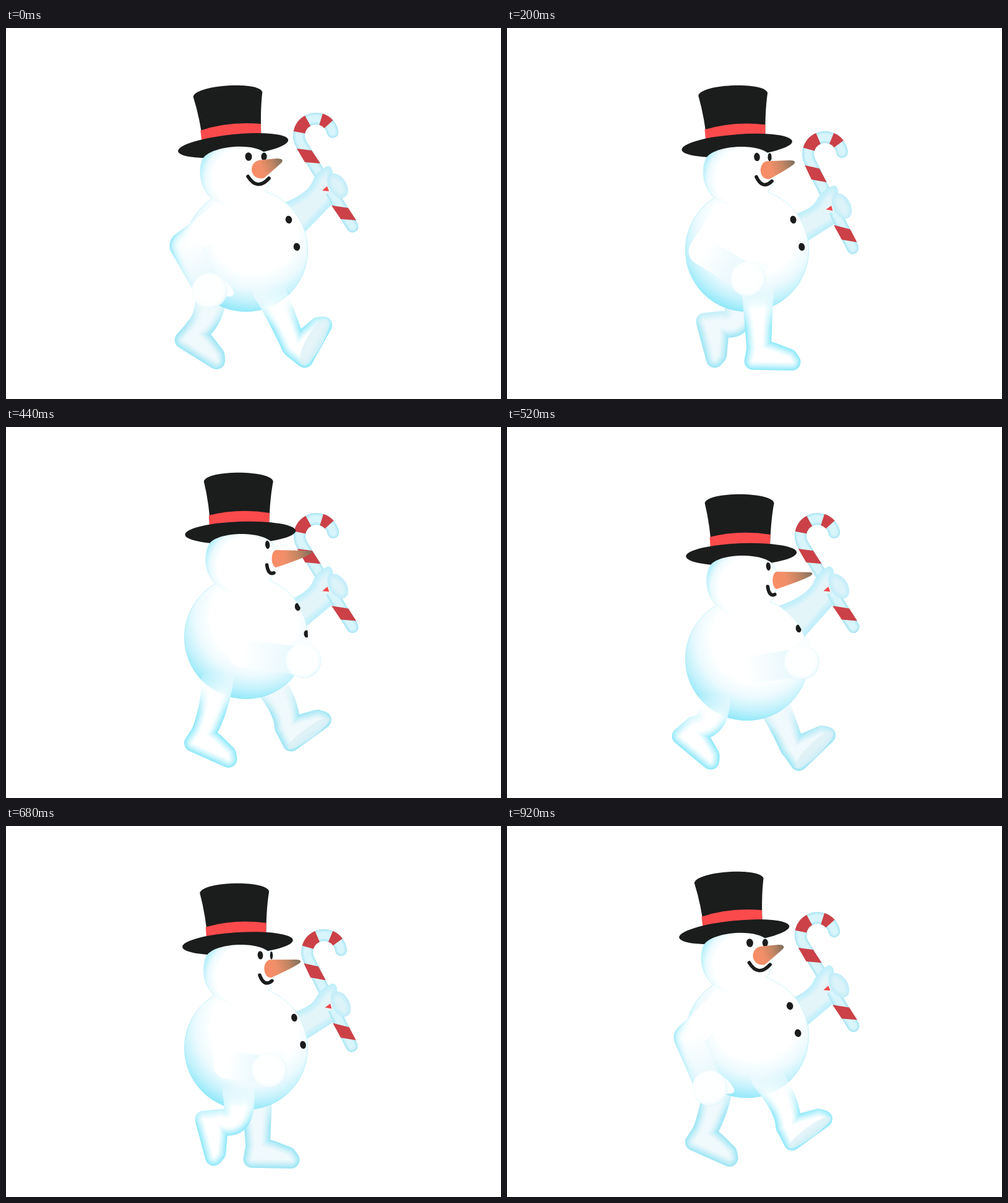
Animation, 800 px wide and 600 px high, one loop 0.96 s. Source, as an HTML page with a canvas:

```html
<!DOCTYPE html>
<html lang="en">
<head>
<meta charset="utf-8">
<title>Marching snowman</title>
<style>
html, body { margin: 0; width: 100%; height: 100%; overflow: hidden; background: #fff; }
canvas { display: block; width: 800px; height: 600px; }
</style>
</head>
<body>
<canvas id="stage" width="800" height="600"></canvas>
<script>
const LOOP = 960, STEP = 40, TAU = Math.PI * 2;
const INK = '#1b1c1c', RED = '#cb4147';
const ctx = document.getElementById('stage').getContext('2d');
const layer = document.createElement('canvas');
layer.width = 800;
layer.height = 600;
const legCtx = layer.getContext('2d');

// Body height over half a loop, one value per step.
const BOB = [40, 56, 66, 67, 57, 40, 22, 7, 0, -3.5, 4, 21];

// time, hip x, knee x, knee y, ankle x, ankle y, foot angle
const LEG = [
  [0, 425, 445, 465, 466, 516, -61],
  [120, 425, 440, 492, 443, 514, 0],
  [200, 405, 406, 465, 407, 515, 1],
  [320, 373, 368, 440, 364, 502, 13],
  [440, 342, 336, 452, 320, 493, 24],
  [480, 333, 326, 468, 307, 489, 32],
  [600, 345, 349, 490, 304, 484, 55],
  [680, 375, 376, 478, 345, 477, 75],
  [800, 415, 428, 425, 413, 441, 25],
  [920, 420, 450, 452, 454, 486, -36]
];

// time, elbow x, elbow y, hand x, hand y, thumb angle
const ARM = [
  [0, 287, 352, 329, 425, 6],
  [200, 316, 361, 390, 406, -35],
  [320, 365, 347, 443, 388, -61],
  [440, 383, 367, 481, 378, -75],
  [600, 380, 410, 458, 386, -68],
  [800, 317, 338, 370, 411, -14],
  [920, 292, 342, 328, 424, 6]
];

// Smooth periodic interpolation through a table of rows.
function sample(rows, t) {
  const n = rows.length;
  const at = i => {
    const turn = Math.floor(i / n), row = rows[i - turn * n];
    return [row[0] + turn * LOOP, ...row.slice(1)];
  };
  t = (t % LOOP + LOOP) % LOOP;
  let i = n - 1;
  while (rows[i][0] > t) i--;
  const [p, a, b, q] = [at(i - 1), at(i), at(i + 1), at(i + 2)];
  const span = b[0] - a[0], s = (t - a[0]) / span;
  return a.slice(1).map((v, j) => {
    const c = j + 1;
    const ma = (b[c] - p[c]) / (b[0] - p[0]) * span;
    const mb = (q[c] - v) / (q[0] - a[0]) * span;
    const d = b[c] - v;
    return v + s * (ma + s * (3 * d - 2 * ma - mb + s * (ma + mb - 2 * d)));
  });
}

const rad = deg => deg * Math.PI / 180;
const mix = (a, b, f) => `rgb(${a.map((v, i) => Math.round(v + (b[i] - v) * f))})`;

function radial(x, y, r, ...stops) {
  const g = ctx.createRadialGradient(x, y, 0, x, y, r);
  stops.forEach(([at, color]) => g.addColorStop(at, color));
  return g;
}

function linear(c, x0, y0, x1, y1, ...colors) {
  const g = c.createLinearGradient(x0, y0, x1, y1);
  colors.forEach((color, i) => g.addColorStop(i / (colors.length - 1), color));
  return g;
}

function oval(x, y, rx, ry, turn, fill) {
  ctx.beginPath();
  ctx.ellipse(x, y, rx, ry, turn, 0, TAU);
  ctx.fillStyle = fill;
  ctx.fill();
}

function poly(fill, ...pts) {
  ctx.beginPath();
  pts.forEach(p => ctx.lineTo(...p));
  ctx.fillStyle = fill;
  ctx.fill();
}

function line(path, color, width, cap = 'round') {
  ctx.strokeStyle = color;
  ctx.lineWidth = width;
  ctx.lineCap = cap;
  ctx.lineJoin = 'round';
  ctx.stroke(path);
}

// Fills a shape and darkens it softly towards its outline.
function soft(path, base, rim, depth) {
  ctx.save();
  ctx.clip(path);
  ctx.fillStyle = base;
  ctx.fill(path);
  ctx.globalAlpha = 0.13;
  for (let i = 1; i <= 6; i++) line(path, rim, depth * 2 * i / 6);
  ctx.restore();
}

// Bent, tapering limb plus foot, painted in shrinking layers from rim to base.
function leg(c, t, dy, rim, base) {
  const [hx, kx, ky, ax, ay, turn] = sample(LEG, t);
  const hy = 385 + dy;
  const bx = 1.5 * kx - (hx + ax) / 4, by = 1.5 * ky - (hy + ay) / 4;
  const bend = (s, a, b, d) => (1 - s) * (1 - s) * a + 2 * s * (1 - s) * b + s * s * d;
  const foot = new Path2D();
  const co = Math.cos(rad(turn)), si = Math.sin(rad(turn));
  for (const [x, y] of [[-5, 0], [-9, 24], [54, 24], [49, 17], [22, 7]]) {
    foot.lineTo(ax + x * co - y * si, ay + x * si + y * co);
  }
  foot.closePath();
  c.lineJoin = 'round';
  for (let i = 0; i <= 16; i++) {
    const f = i / 16, inset = 15 * f;
    const color = mix(rim, base, 1 - Math.pow(1 - f, 1.4));
    c.fillStyle = c.strokeStyle = linear(c, 0, 395 + dy, 0, 445 + dy, mix(base, base, 0), color);
    const limb = new Path2D();
    for (let s = 0; s <= 1; s += 0.025) {
      const x = bend(s, hx, bx, ax), r = 26 - 6 * s - inset;
      limb.moveTo(x + r, bend(s, hy, by, ay));
      limb.arc(x, bend(s, hy, by, ay), r, 0, TAU);
    }
    c.fill(limb);
    c.fill(foot);
    c.lineWidth = Math.max(28 - 2 * inset, 0.5);
    c.stroke(foot);
  }
  // The sole shows while the toes point up.
  const tilt = 15 * Math.max(0, -si);
  c.save();
  c.translate(ax, ay);
  c.rotate(rad(turn));
  c.beginPath();
  c.ellipse(23, 37 - tilt, 42, tilt, 0, 0, TAU);
  c.fillStyle = 'rgba(220,241,246,.75)';
  c.fill();
  c.restore();
}

function nearLeg(t, dy) {
  legCtx.globalCompositeOperation = 'source-over';
  legCtx.clearRect(0, 0, 800, 600);
  leg(legCtx, t, dy, [142, 232, 250], [255, 255, 255]);
  // Let the thigh melt into the belly.
  legCtx.globalCompositeOperation = 'destination-in';
  legCtx.fillStyle = linear(legCtx, 0, 375 + dy, 0, 415 + dy, 'rgba(0,0,0,0)', '#000');
  legCtx.fillRect(0, 0, 800, 600);
  ctx.drawImage(layer, 0, 0);
}

function caneArm(t, dy) {
  const u = (1 - Math.cos(TAU * t / 480)) / 2;
  const turn = rad(5.9 * u), co = Math.cos(turn), si = Math.sin(turn);
  const cx = 530 + 6 * u, cy = 251 + 34.7 * u;
  const at = (x, y) => {
    const px = x - 530, py = y - 251;
    return [cx + px * co - py * si, cy + px * si + py * co];
  };
  const inCane = draw => {
    ctx.save();
    ctx.translate(cx, cy);
    ctx.rotate(turn);
    ctx.translate(-530, -251);
    draw();
    ctx.restore();
  };
  const stick = (path, cap) => {
    line(path, '#a9e6f4', 19, cap);
    line(path, '#c4eef8', 16, cap);
    line(path, '#d8f5fc', 11, cap);
  };
  const stripe = (a, b) => {
    const arc = new Path2D();
    arc.arc(501, 174, 27.5, rad(a), rad(b));
    line(arc, RED, 19, 'butt');
  };

  inCane(() => {
    const cane = new Path2D('M560 321L477.6 188.4');
    cane.arc(501, 174, 27.5, rad(148.4), rad(348));
    stick(cane);
    stripe(191, 241);
    stripe(287, 318);
    poly(RED, [470, 195], [494, 198], [508, 219], [483, 217]);
  });

  const arm = new Path2D();
  arm.moveTo(440, 281 + 22 * u + 0.12 * dy);
  arm.quadraticCurveTo(...at(485, 271), ...at(495, 249));
  arm.quadraticCurveTo(...at(502, 231), ...at(520, 223));
  arm.quadraticCurveTo(...at(528, 224), ...at(528, 238));
  arm.lineTo(...at(538, 260));
  arm.lineTo(...at(527, 285));
  arm.lineTo(440, 346 + 0.7 * dy);
  arm.closePath();
  soft(arm, '#e4f5fa', '#a4e5f4', 12);

  inCane(() => {
    stick(new Path2D('M525 264L560 321'), 'butt');
    stick(new Path2D('M552 308L560 321'));
    poly(RED, [526, 287], [553, 291], [566, 311], [541, 309]);
    poly('#f2484b', [511, 263], [519, 256], [522, 264]);
    const fingers = new Path2D();
    fingers.ellipse(536, 255, 22, 14, rad(56), 0, TAU);
    soft(fingers, '#dcf3f9', '#b4e8f5', 8);
  });
}

function body(dy) {
  const y = 319 + dy;
  oval(388, y, 100, 100, 0, radial(401, y - 32, 135,
    [0, '#fff'], [0.52, '#fff'], [0.7, '#ecfafe'], [0.85, '#c6f2fc'], [1, '#8ee8fa']));
  const edge = new Path2D();
  edge.arc(388, y, 99.5, 0, TAU);
  line(edge, 'rgba(150,232,248,.5)', 1);
}

function buttons(dy, k) {
  ctx.save();
  ctx.beginPath();
  ctx.arc(388, 319 + dy, 100, 0, TAU);
  ctx.clip();
  oval(457 + 14.5 * k, 270 + dy, 5.3 - 0.8 * k, 6.3, -0.2, INK);
  oval(470 + 16.3 * k, 314 + dy, 5.3 - 0.8 * k, 6.3, -0.2, INK);
  ctx.restore();
}

function nearArm(t, dy) {
  const [ex, ey, hx, hy, thumb] = sample(ARM, t);
  const whole = new Path2D(`M358 ${258 + dy}L${ex} ${ey}L${hx} ${hy}`);
  const fore = new Path2D(`M${ex} ${ey}L${hx} ${hy}`);
  line(whole, radial(388, 319 + dy, 124,
    [0, '#fff'], [0.75, '#fff'], [0.87, '#c4f2fc'], [1, '#93e9fa']), 45, 'butt');
  for (let w = 41; w > 12; w -= 4) line(whole, 'rgba(255,255,255,.22)', w, 'butt');
  line(fore, linear(ctx, ex, ey, hx, hy, 'rgba(222,245,252,0)', 'rgba(222,245,252,.85)'), 45, 'butt');

  ctx.save();
  ctx.translate(hx, hy);
  ctx.rotate(rad(thumb));
  ctx.beginPath();
  ctx.moveTo(4, -27);
  ctx.quadraticCurveTo(32, -18, 40, 0);
  ctx.quadraticCurveTo(38, 7, 24, 6);
  ctx.closePath();
  ctx.fillStyle = '#fafeff';
  ctx.fill();
  ctx.restore();
  oval(hx, hy, 28.5, 28.5, 0, radial(hx - 2, hy - 2, 31,
    [0, '#fff'], [0.75, '#fdffff'], [0.9, '#f5fcfe'], [1, '#def6fc']));
}

function hat() {
  ctx.fillStyle = INK;
  ctx.fill(new Path2D('M320 67C324 48 428 48 432 67Q426 98 425 148H331Q329 104 320 67Z'));
  ctx.fillStyle = '#fb4a4c';
  ctx.fill(new Path2D('M328 122Q375 110 426 118L425 142H329Z'));
  oval(379, 150, 89.5, 18, rad(-2), INK);
}

function face(dy, k) {
  ctx.save();
  ctx.translate(0, dy);
  oval(392 + 31 * k, 168 + 1.5 * k, 5.5 - 1.9 * k, 6.8, -0.1, INK);
  if (k < 0.8) oval(417 + 19.5 * k, 168 + 2 * k, 4.6 - 3.9 * k, 6.5, 0, INK);

  const mouth = new Path2D();
  mouth.moveTo(391 + 31 * k, 200 + 2 * k);
  mouth.quadraticCurveTo(406 + 18 * k, 224 - 5 * k, 425 + 8 * k, 203 + 12 * k);
  line(mouth, INK, 5.6);

  const x = 412 + 25 * k, y = 188.5 + 3.5 * k, rx = 15 - 8 * k, ry = 15 - k;
  const tx = 446 + 48 * k, ty = 175 + 6 * k;
  ctx.beginPath();
  ctx.ellipse(x, y, rx, ry, 0, rad(70), rad(270));
  ctx.lineTo(tx - 8, ty - 4 + 2 * k);
  ctx.quadraticCurveTo(tx + 3, ty - 4 + 2 * k, tx, ty + 2);
  ctx.quadraticCurveTo(tx - 6, ty + 8, x + rx * 0.34, y + ry * 0.94);
  ctx.fillStyle = linear(ctx, x - rx, y + 4, tx, ty, '#fb8c66', '#f08f69', '#c48563', '#80705e');
  ctx.fill();
  ctx.restore();
}

function inHead(dy, k, draw) {
  ctx.save();
  ctx.translate(380 - 9 * (1 - k), 193 + dy);
  ctx.rotate(rad(-3.9 * (1 - k)));
  ctx.translate(-380, -193);
  draw();
  ctx.restore();
}

function render(t) {
  const dy = BOB[Math.round(t / STEP) % BOB.length];
  const k = (1 + Math.cos(TAU * (t - 475) / LOOP)) / 2;

  ctx.fillStyle = '#fff';
  ctx.fillRect(0, 0, 800, 600);
  caneArm(t, dy);
  leg(ctx, t + LOOP / 2, dy, [156, 229, 245], [240, 249, 252]);
  inHead(dy, k, () => {
    const edge = new Path2D();
    edge.arc(380, 193, 57, 0, TAU);
    line(edge, '#c4f1fa', 1.2);
  });
  body(dy);
  nearLeg(t, dy);
  buttons(dy, k);
  nearArm(t, dy);
  inHead(dy, k, () => {
    hat();
    const head = new Path2D();
    head.arc(380, 193, 57, rad(-27), rad(207));
    head.bezierCurveTo(345, 147, 416, 147, 431, 167);
    ctx.fillStyle = radial(389, 204, 69,
      [0, '#fff'], [0.68, '#fff'], [0.85, '#ebfafe'], [1, '#b4effb']);
    ctx.fill(head);
  });
  face(dy, k);
}

const start = performance.now();
function tick() {
  const t = (performance.now() - start) % LOOP;
  render(Math.floor(t / STEP) * STEP);
  requestAnimationFrame(tick);
}
tick();
</script>
</body>
</html>
```
